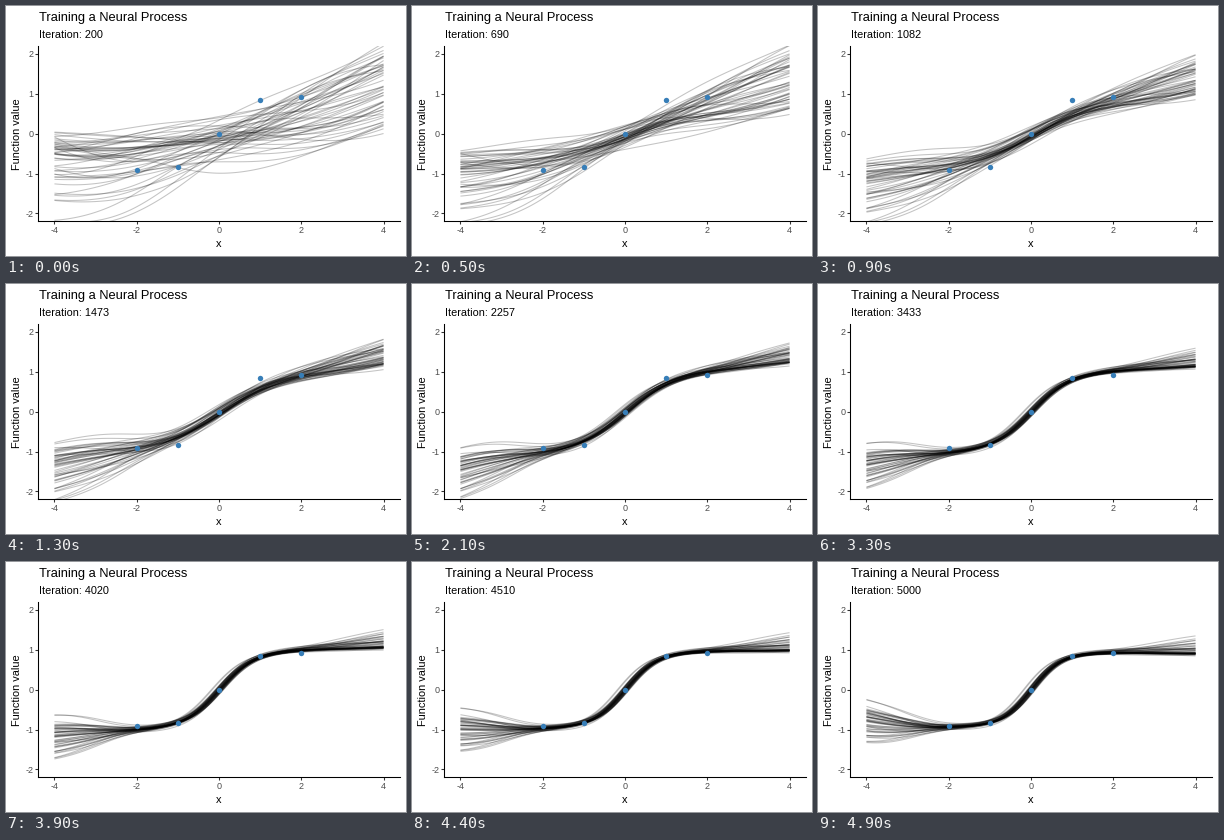
A matplotlib script for the animation above (5000 ms loop, 400 px wide and 250 px high).

```python
import numpy as np
import matplotlib.pyplot as plt
from matplotlib.animation import FuncAnimation
from matplotlib.collections import LineCollection

WIDTH, HEIGHT, DPI = 400, 250, 100
FRAMES, INTERVAL = 50, 100
PX = 72 / DPI
N_CURVES = 50

plt.rcParams["font.family"] = "Liberation Sans"

grid = np.linspace(-4, 4, 121)

# Latent values of each sampled function, fixed over the whole training
rng = np.random.default_rng(4)
column = (N_CURVES, 1)
right_level = rng.permutation((np.arange(N_CURVES) + .5) / N_CURVES)[:, None]
left_level = rng.uniform(size=(2, *column)).mean(axis=0)
shift, wave, left_jitter, right_jitter = rng.normal(size=(4, *column))
phase = rng.uniform(0, 2 * np.pi, column)


def sigmoid(z):
    return .5 + .5 * np.tanh(z / 2)


def curves(p):
    """Sampled functions at training progress p, from 0 to 1."""
    early = np.exp(-4.5 * p)

    # The common shape tightens from a loose ramp to a step
    height = .92 * (1 - np.exp(-4.2 * p))
    steepness = .6 + .8 * p
    slope = .02 + .22 * (1 - p)
    moved = grid - shift * (.06 + .2 * early)
    ys = height * np.tanh(steepness * moved) + slope * grid
    ys = ys + early * (.02 * grid**2 - .1)
    ys += (.36 * (p - .5)**2 - .04) * np.maximum(-grid - 2, 0)**2

    # Each function leaves the common shape at both ends
    right_reach = .6 + 1.6 * np.exp(-(p / .17)**2)
    power = 1 + 3 * p
    right = right_reach * (right_level**power - 1 / (power + 1))
    right_start = 3.2 - 2.2 * early + right_jitter * (.2 + .7 * early)
    ys += right * sigmoid((grid - right_start) / .75)

    left_reach = 1.4 + 1.4 * early
    power = 1 + 1.5 * early
    left = left_reach * (left_level**power - .5**power)
    left_start = -3.1 + 1.9 * early + left_jitter * (.15 + .7 * early)
    ys -= left * sigmoid((left_start - grid) / (.45 + .4 * early))

    ys += wave * (.03 + .17 * early) * np.sin(.7 * grid + phase)
    return [np.column_stack([grid, y]) for y in ys]


fig = plt.figure(figsize=(WIDTH / DPI, HEIGHT / DPI), dpi=DPI, facecolor="white")
ax = fig.add_axes([32 / WIDTH, 1 - 215.4 / HEIGHT, 362 / WIDTH, 175.6 / HEIGHT])
ax.set(xlim=(-4.4, 4.4), ylim=(-2.2, 2.2))
ax.spines[["top", "right"]].set_visible(False)
ax.spines[["left", "bottom"]].set_linewidth(1.07 * PX)
ticks_x, ticks_y = range(-4, 5, 2), range(-2, 3)
ax.set_xticks(ticks_x, map(str, ticks_x))
ax.set_yticks(ticks_y, map(str, ticks_y))
ax.tick_params(length=2.75 * PX, width=1.07 * PX, pad=1.8 * PX,
               color="#333333", labelcolor="#4d4d4d", labelsize=9 * PX)


def label(x, y, text, size, **kw):
    return fig.text(x / WIDTH, 1 - y / HEIGHT, text, fontsize=size * PX,
                    color="black", va="baseline", **kw)


label(33, 15, "Training a Neural Process", 12.95)
subtitle = label(33, 32, "", 10.9)
label(213, 241, "x", 11, ha="center")
label(14.4, 128, "Function value", 11, ha="center", rotation=90,
      rotation_mode="anchor")

lines = LineCollection([], colors=[(0, 0, 0, .23)], linewidths=1.07 * PX, zorder=2)
ax.add_collection(lines, autolim=False)
points = np.arange(-2, 3)
ax.plot(points, np.sin(points), "o", color="#377eb8", ms=5.4 * PX, mew=0, zorder=3)


def update(frame):
    p = frame / (FRAMES - 1)
    subtitle.set_text(f"Iteration: {round(200 + 4800 * p)}")
    lines.set_segments(curves(p))
    return lines, subtitle


anim = FuncAnimation(fig, update, frames=FRAMES, interval=INTERVAL,
                     repeat=True, repeat_delay=0)
plt.show()
```
